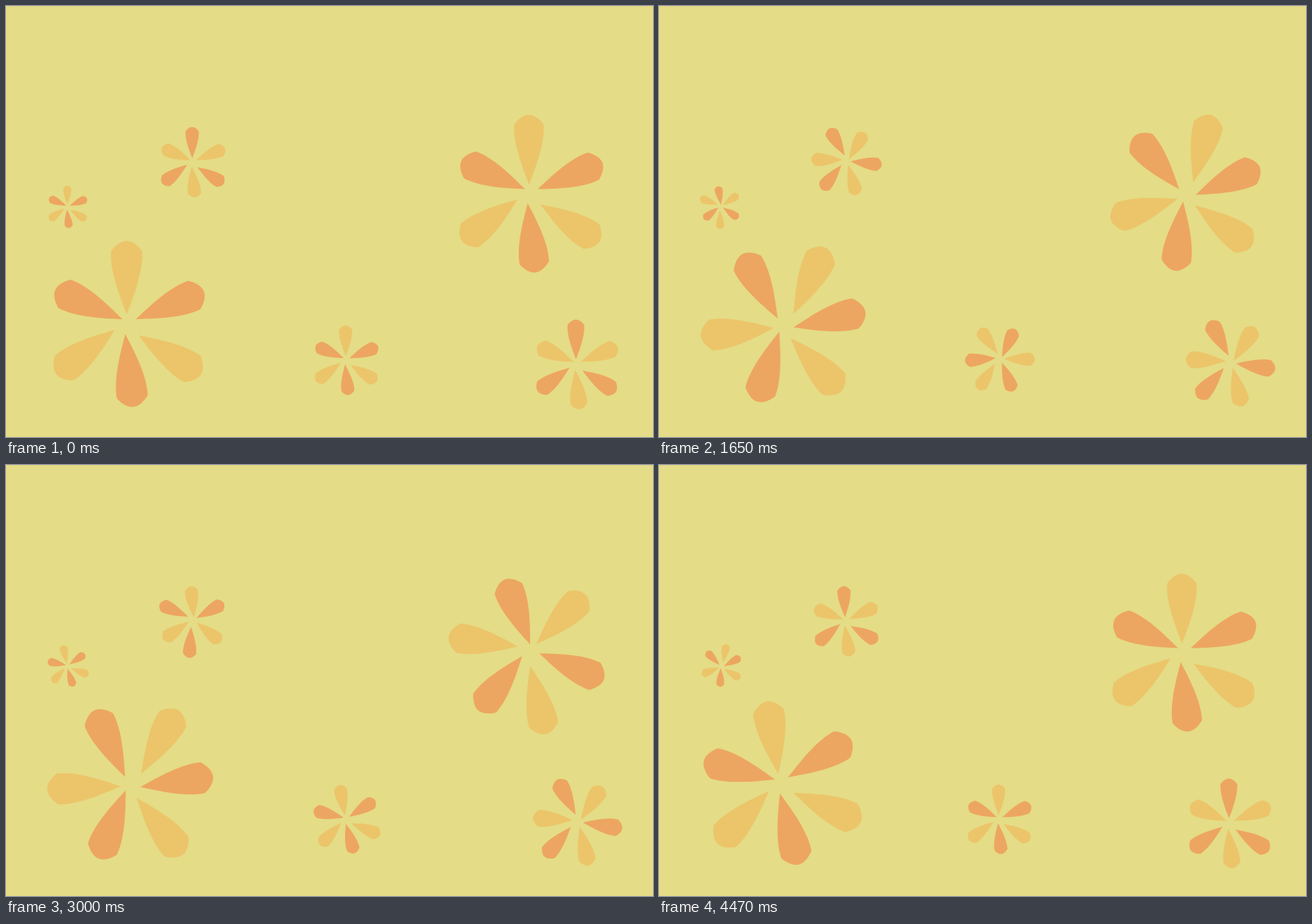
An HTML page with a canvas that plays this animation: 916 px wide and 611 px high, repeating every 4500 ms.

```html
<!DOCTYPE html>
<html lang="en">
<head>
<meta charset="utf-8">
<title>Turning flowers</title>
<style>
  html, body { margin: 0; width: 100%; height: 100%; overflow: hidden; background: #e4dc86; }
  canvas { display: block; }
</style>
</head>
<body>
<canvas id="stage" width="916" height="611"></canvas>
<script>
const ctx = document.getElementById('stage').getContext('2d');
const LOOP = 4500, STEP = 30, END = LOOP - STEP;
const LIGHT = '#ecc56a', ORANGE = '#eda661';
const PETALS = 6;

const radians = degrees => degrees * Math.PI / 180;
const sin = degrees => Math.sin(radians(degrees));
const cos = degrees => Math.cos(radians(degrees));

// One petal, pointing up from its tip at the origin.
const petal = new Path2D(
  'M0 0C-10 -26 -24 -62 -22 -89.5C-15 -99 -7 -104 0 -104C7 -104 15 -99 22 -89.5C24 -62 10 -26 0 0Z');

// The tips lie on a ring around the pivot; a second wave makes it look hand-cut.
function placePetal(i) {
  const around = i * 360 / PETALS;
  const side = i % 2 ? -1 : 1;
  return {
    x: -3.7 + 15.4 * sin(around + 7) - 4.7 * sin(2 * around + 23) - 0.8 * side,
    y: 2.2 - 15.8 * cos(around + 8) - 2.8 * sin(2 * around + 36) + 1.7 * side,
    direction: around - 1.7 + 7.3 * sin(around + 25) + 2.1 * sin(2 * around - 50)
  };
}

// Steady turn from one angle to the next, passing through the given swings.
function angleAt(time, swings, rest) {
  let from = { at: 0, angle: 0 };
  for (const to of [...swings, { at: END, angle: rest }]) {
    if (time <= to.at) {
      const progress = (time - from.at) / (to.at - from.at);
      return from.angle + (to.angle - from.angle) * progress;
    }
    from = to;
  }
  return rest;
}

const swing = (at, angle) => ({ at, angle });

function drawFlower(x, y, size, colors, angle) {
  ctx.save();
  ctx.translate(x, y);
  ctx.rotate(radians(angle));
  ctx.scale(size, size);
  for (let i = 0; i < PETALS; i++) {
    const tip = placePetal(i);
    ctx.save();
    ctx.translate(tip.x, tip.y);
    ctx.rotate(radians(tip.direction));
    ctx.fillStyle = colors[i % 2];
    ctx.fill(petal);
    ctx.restore();
  }
  ctx.restore();
}

function draw(elapsed) {
  const time = Math.floor((elapsed % LOOP) / STEP) * STEP;
  const turn = (swings, rest = 0) => angleAt(time, swings, rest);
  const lightTop = [LIGHT, ORANGE], orangeTop = [ORANGE, LIGHT];

  ctx.fillStyle = '#e4dc86';
  ctx.fillRect(0, 0, 916, 611);
  ctx.fillStyle = '#dfd788';
  ctx.fillRect(0, 0, 916, 1);

  drawFlower(175.5, 450.5, 1, lightTop, turn([swing(2280, -133)], -8.8));
  drawFlower(744.9, 265.8, 0.95, lightTop, turn([swing(1470, -127.5), swing(3240, 72)]));
  drawFlower(265.6, 221.4, 0.425, orangeTop, turn([swing(1875, 110)], -2.4));
  drawFlower(88, 284.8, 0.255, lightTop, turn([swing(1875, 64.7)], -111.8));
  drawFlower(482.8, 502, 0.42, lightTop, turn([swing(2190, 121), swing(3400, -74.5)]));
  drawFlower(809.4, 508, 0.54, orangeTop, turn([swing(2370, 141.6)]));
}

const start = performance.now();
function tick() {
  draw(performance.now() - start);
  requestAnimationFrame(tick);
}
tick();
</script>
</body>
</html>
```
